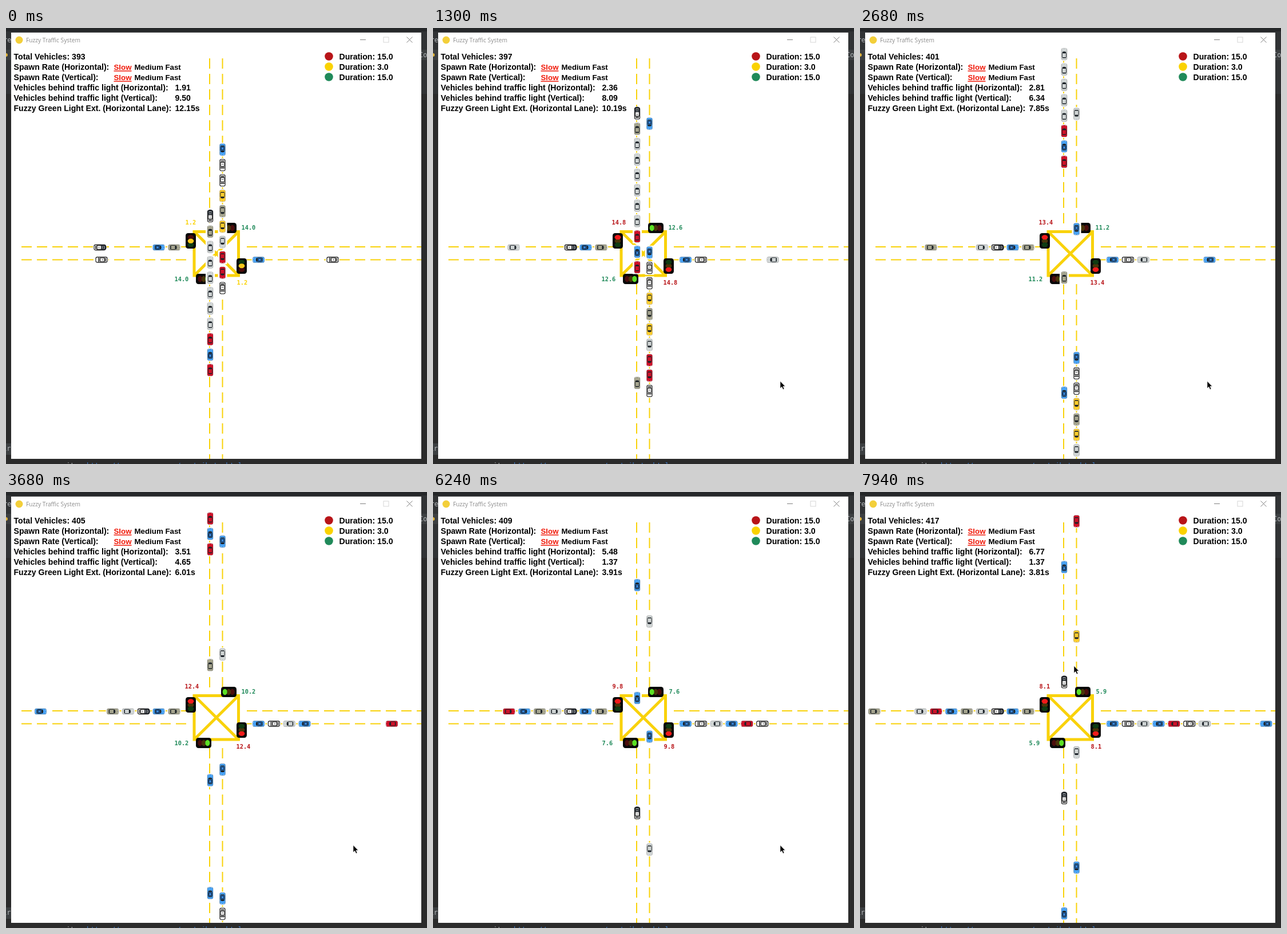
Recreate the animation shown at these times as an HTML page. Size 736 by 761 pixels, loop 8 s.

```html
<!DOCTYPE html>
<html lang="en">
<head>
<meta charset="utf-8">
<title>Fuzzy Traffic System</title>
<style>
  html, body { margin: 0; width: 100%; height: 100%; overflow: hidden; background: #2b2b2b; }
  svg { display: block; width: 736px; height: 761px; }
  .hud { font: bold 14.1px "Liberation Sans", Arial, sans-serif; fill: #000; }
  .option { font-size: 13.3px; }
  .slow { fill: #f01808; }
  .timer { font: bold 10.3px "DejaVu Sans Mono", monospace; }
  .ide { font: 11.9px "DejaVu Sans Mono", monospace; fill: #b4b8bb; }
  .caption { font: 10.2px "Open Sans", sans-serif; fill: #8c8c8c; }
</style>
</head>
<body>
<svg viewBox="0 0 736 761" xmlns="http://www.w3.org/2000/svg">
  <defs>
    <clipPath id="client"><rect x="9" y="32" width="717" height="720"/></clipPath>
    <g id="pad"><rect x="-8" y="-12" width="16" height="24" fill="#fff"/></g>
    <g id="car">
      <use href="#pad"/>
      <rect x="-5" y="-10.2" width="10" height="20.4" rx="2.8" fill="currentColor" stroke="#222" stroke-opacity=".35" stroke-width=".7"/>
      <path d="M-3.6-3.4Q0-5.8 3.6-3.4L2.8-1.4H-2.8Z M-3 5.4H3L3.4 7H-3.4Z" fill="#1c2228"/>
      <path d="M-3.6-1.8V5.6M3.6-1.8V5.6" stroke="#1c2228" stroke-width=".9"/>
      <path d="M-3.5-9.3H-1.8M1.8-9.3H3.5" stroke="#fff" stroke-opacity=".6"/>
    </g>
    <g id="blue">
      <use href="#car"/>
      <rect x="-2.3" y="-.3" width="4.6" height="4.6" fill="#3d8fe0" stroke="#0d2c58" stroke-width="1.2"/>
    </g>
    <g id="white">
      <use href="#pad"/>
      <rect x="-4.6" y="-10" width="9.2" height="20" rx="2.5" fill="#fff" stroke="#111" stroke-width="1.1"/>
      <path d="M-4-5H4M-3-2.6H3M-3.5 5H3.5M-3 7.3H3" stroke="#111" stroke-width="1.4"/>
      <path d="M-3.3-3V5M3.3-3V5" stroke="#111"/>
      <path d="M-1.5 1.5H1.5" stroke="#555"/>
    </g>
    <g id="pickup">
      <use href="#white"/>
      <path d="M-5-2V-7.5Q-4.5-11.5 0-11.5T5-7.5V-2Z" fill="#20242a"/>
      <path d="M-2.8-7Q0-8.8 2.8-7M-2.5-4.2H2.5" fill="none" stroke="#b9c0c4" stroke-width="1.1"/>
    </g>
  </defs>

  <rect width="736" height="761" fill="#2b2b2b"/>
  <path d="M0 0H736V115H0Z" fill="#313335"/>
  <path d="M0 0H736V6H0Z" fill="#252729"/>
  <path d="M0 38H9V56H0ZM726 38H736V56H726ZM0 725H9V745H0Z" fill="#3c3f41"/>
  <g class="ide">
    <text x="-12" y="25">ire</text>
    <circle cx="0" cy="47" r="3" fill="#e0b33a"/>
    <text x="722" y="51">Co</text>
    <text x="-13" y="738">air</text>
    <text x="413" y="767.8" text-anchor="end">Hello from the pygame community. <tspan fill="#3f7fd0">https://www.pygame.org/contribute.html</tspan></text>
  </g>

  <rect x="9" y="8" width="717" height="744" fill="#fff"/>
  <circle cx="23" cy="21" r="6.5" fill="#f3cf3a"/>
  <text class="caption" x="35" y="25">Fuzzy Traffic System</text>
  <g fill="none" stroke="#808080">
    <path d="M619 20.5H629M700.5 15.5L710.5 25.5M710.5 15.5L700.5 25.5"/>
    <rect x="660" y="16" width="9" height="9" stroke="#d6d6d6"/>
  </g>

  <g fill="none" stroke="#f9d20a">
    <path stroke-width="2" stroke-dasharray="18 9" d="M356 53V341M378.5 53V341M356 447V752M378.5 447V752M27 382H315M27 404.5H315M421 382H726M421 404.5H726"/>
    <path stroke-width="5" d="M329 355.5H406.5V432H329ZL406.5 432M406.5 355.5L329 432"/>
  </g>
  <g id="lights"></g>
  <g id="cars" clip-path="url(#client)"></g>
  <g id="timers" class="timer"></g>
  <g id="hud" class="hud"></g>
  <path id="cursor" d="M0 0V12.5L2.8 9.8L5 14.5L7 13.5L5 9H8.8Z" fill="#000" stroke="#fff" stroke-width=".6"/>
</svg>
<script>
const LOOP = 8000, STEP = 77.16, GAP = 26.85;
const RED = '#b81418', YELLOW = '#fad201', GREEN = '#208a5a';
const PAINT = { b: '#48a2f4', r: '#d01028', o: '#a5a48e', l: '#d0d5d5', y: '#ffce2c' };

// Values sampled at these steps, linear in between
const KEYS = [0, 17, 35, 48, 60, 81, 103];
const TRAVEL = [0, 179.5, 363.5, 497, 617.5, 837.5, 1066];
const WAIT_H = [1.91, 2.36, 2.81, 3.51, 4.19, 5.48, 6.77];
const WAIT_V = [9.5, 8.09, 6.34, 4.65, 3, 1.37, 1.37];
const EXTEND = [12.15, 10.19, 7.85, 6.01, 4.84, 3.91, 3.81];

// Each wave: offset, then kinds heading down, up, right, left
const WAVES = [[-12.5, 'boll'], [-213.5, 'lbob'], [-410.5, 'bbbr'],
               [-611.5, 'lprw'], [-814, 'ypll'], [-1015, 'rbob']];

const $ = id => document.getElementById(id);

function at(values, k) {
  let i = 1;
  while (i < KEYS.length - 1 && k > KEYS[i]) i++;
  const f = (k - KEYS[i - 1]) / (KEYS[i] - KEYS[i - 1]);
  return values[i - 1] + (values[i] - values[i - 1]) * f;
}

function car(kind, x, y, turn) {
  const shape = { b: 'blue', w: 'white', p: 'pickup' }[kind] || 'car';
  return `<use href="#${shape}" color="${PAINT[kind] || '#fff'}" transform="translate(${x.toFixed(1)} ${y.toFixed(1)}) rotate(${turn})"/>`;
}
const up = (kind, y) => y < 44 ? '' : car(kind, 357, y, 0);
const down = (kind, y) => y > 764 ? '' : car(kind, 378.5, y, 180);
const right = (kind, x, slot) => car(kind, Math.min(x, 294 - GAP * slot), 383, 90);
const left = (kind, x, slot) => car(kind, Math.max(x, 441.5 + GAP * slot), 404.5, -90);

function traffic(d, waves) {
  let s = '';
  [...'pollllllrbr'].forEach((c, i) => s += up(c, 328.5 + GAP * i - d));
  [...'wrrlyoywwb'].forEach((c, i) => s += down(c, 454 - GAP * i + d));
  s += right('o', 294, 0) + right('b', 267, 1) + right('p', 164 + d, 2);
  s += left('b', 441, 0) + left('w', 571 - d, 1);
  if (167 - d > 19) s += car('w', 167 - d, 404.5, -90);
  waves.forEach(([y0, kinds], i) => {
    const y = y0 + d;
    s += down(kinds[0], y) + up(kinds[1], 786.5 - y);
    s += right(kinds[2], y - 26, i + 3) + left(kinds[3], 761 - y, i + 2);
  });
  return s;
}

function light(x, y, turn, lit) {
  const dim = ['#4c0d0d', '#4a3409', '#0f3c12'], on = ['#f21a1a', '#f8c81a', '#5ce024'];
  const lamp = (i, color) => `<ellipse cy="${(i - 1) * 6.5 + .3}" rx="5.3" ry="4" fill="${color}"/>`;
  return `<g transform="translate(${x} ${y}) rotate(${turn})">
    <rect x="-9" y="-13.5" width="18" height="27" rx="4.5" fill="#080808"/>
    ${dim.map((c, i) => lamp(i, c)).join('')}${lamp(lit, on[lit])}</g>`;
}

const text = (x, y, s, extra = '') => `<text x="${x}" y="${y}" ${extra}>${s}</text>`;

function timers(go, stop, color) {
  const put = (x, y, v, c) => text(x + (v < 10 ? 1 : 0), y, v.toFixed(1), `fill="${c}"`);
  return put(312.5, 343, stop, color) + put(402.5, 448, stop, color) +
         put(411.5, 352, go, GREEN) + put(294.5, 442, go, GREEN);
}

function hud(k, total) {
  let s = text(13.5, 55, 'Total Vehicles: ' + total);
  [['Horizontal', 73], ['Vertical', 91]].forEach(([axis, y]) => {
    s += text(13.5, y, `Spawn Rate (${axis}):`) + text(188.5, y, 'Slow', 'class="option slow"') +
         `<path d="M188.5 ${y + 2}H219.5" stroke="#f01808" stroke-width="1.5"/>` +
         text(224.5, y, 'Medium Fast', 'class="option"');
  });
  [['Vehicles behind traffic light (Horizontal):', WAIT_H, ''],
   ['Vehicles behind traffic light (Vertical):', WAIT_V, ''],
   ['Fuzzy Green Light Ext. (Horizontal Lane):', EXTEND, 's']].forEach(([label, values, unit], i) => {
    const y = 109 + 18 * i;
    s += text(13.5, y, label) + text(295.5, y, at(values, k).toFixed(2) + unit);
  });
  [[RED, '15.0'], [YELLOW, '3.0'], [GREEN, '15.0']].forEach(([color, sec], i) => {
    const y = 50 + 18 * i;
    s += `<circle cx="564.5" cy="${y - .5}" r="7.3" fill="${color}"/>` + text(582.5, y + 5, 'Duration: ' + sec);
  });
  return s;
}

function moveCursor(t) {
  const f = Math.min(1, Math.max(0, (t - 7300) / 500));
  const e = f * f * (3 - 2 * f);
  $('cursor').setAttribute('visibility', t < 700 ? 'hidden' : 'visible');
  $('cursor').setAttribute('transform', `translate(${607 - 233 * e} ${616.5 - 313 * e})`);
}

function draw(k) {
  const d = at(TRAVEL, k), sec = d / 132;
  const waves = WAVES.filter(w => w[0] + d >= 50);
  const amber = sec < 1.16, lit = amber ? 1 : 0;
  $('lights').innerHTML = light(323, 371.5, 0, lit) + light(412, 415.5, 180, lit) +
                          light(389.5, 349, 90, 2) + light(345.5, 438, -90, 2);
  $('cars').innerHTML = traffic(d, waves);
  $('timers').innerHTML = timers(13.98 - sec, (amber ? 1.16 : 16.16) - sec, amber ? YELLOW : RED);
  $('hud').innerHTML = hud(k, 393 + 4 * waves.length);
  moveCursor(k * STEP);
}

const start = performance.now();
let shown = -1;
function tick() {
  const t = (performance.now() - start) % LOOP;
  const k = Math.min(103, Math.floor((t + 24) / STEP));
  if (k !== shown) draw(shown = k);
  requestAnimationFrame(tick);
}
tick();
</script>
</body>
</html>
```
